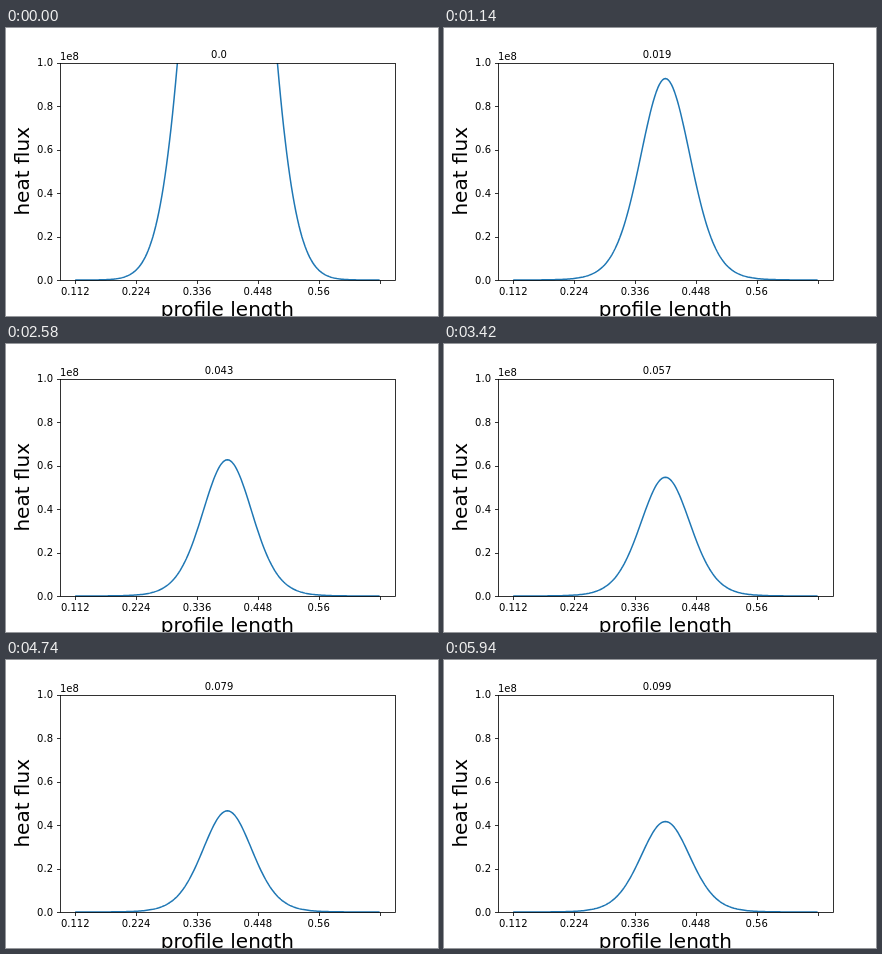
Animation of 432x288 px, one loop 6000 ms. Source, as an HTML page:

```html
<!DOCTYPE html>
<html>
<head>
<meta charset="utf-8">
<style>
html, body { margin: 0; width: 100%; height: 100%; overflow: hidden; background: #fff; }
svg { display: block; font-family: "DejaVu Sans", sans-serif; font-size: 10px; }
.big { font-size: 20px; }
.mid { text-anchor: middle; }
.end { text-anchor: end; }
</style>
</head>
<body>
<svg id="plot" width="432" height="288" viewBox="0 0 432 288">
  <clipPath id="area"><rect x="54" y="35" width="335" height="218"/></clipPath>
  <path id="curve" fill="none" stroke="#1f77b4" stroke-width="1.5" stroke-linejoin="round" clip-path="url(#area)"/>
  <g id="axes" fill="none" stroke="#000" stroke-width="0.8">
    <rect x="54.5" y="35.5" width="335" height="217"/>
  </g>
  <g id="labels">
    <text id="title" class="mid" x="213" y="30"></text>
    <text x="54" y="32">1e8</text>
    <text class="big mid" x="221.4" y="288">profile length</text>
    <text class="big mid" transform="translate(23 143.3) rotate(-90)">heat flux</text>
  </g>
</svg>
<script>
const STEP = 60, COUNT = 100;
const LEFT = 69.2, WIDTH = 304.4, BASE = 252, HEIGHT = 217.44;
const $ = id => document.getElementById(id);

function add(parent, tag, attrs, text) {
  const el = document.createElementNS("http://www.w3.org/2000/svg", tag);
  for (const k in attrs) el.setAttribute(k, attrs[k]);
  if (text) el.textContent = text;
  $(parent).appendChild(el);
}

const snap = v => Math.round(v) + 0.5;

for (let i = 0; i < 6; i++) {
  const x = LEFT + WIDTH * i / 5, y = BASE - HEIGHT * i / 5;
  add("axes", "path", { d: `M${snap(x)} 252.5v3.5M54.5 ${snap(y)}h-3.5` });
  if (i < 5) add("labels", "text", { class: "mid", x, y: 267 }, String(112 * (i + 1) / 1000));
  add("labels", "text", { class: "end", x: 47, y: Math.round(y + 3.65) }, (i / 5).toFixed(1));
}

// Gaussian start that decays towards a narrower 1/sqrt(t) profile
function flux(d, t) {
  const d2 = d * d;
  const start = 3.75 * Math.exp(-d2 / 1891);
  const late = Math.exp(-8.4e-4 * d2 / (1 + d2 / 19400));
  return 1 / Math.sqrt(1 / (start * start) + 57.6 * t / (late * late));
}

function draw(n) {
  const t = n / 1000, pts = [];
  for (let i = 0; i <= 200; i++) {
    const d = WIDTH * (i / 200 - 0.5);
    const y = BASE - HEIGHT * flux(d, t);
    pts.push((LEFT + WIDTH / 2 + d).toFixed(2) + " " + y.toFixed(2));
  }
  $("curve").setAttribute("d", "M" + pts.join("L"));
  $("title").textContent = n ? String(t) : "0.0";
}

let shown = -1;
const begin = performance.now();
function tick() {
  const n = Math.floor((performance.now() - begin) / STEP) % COUNT;
  if (n !== shown) draw(shown = n);
  requestAnimationFrame(tick);
}
tick();
</script>
</body>
</html>
```
